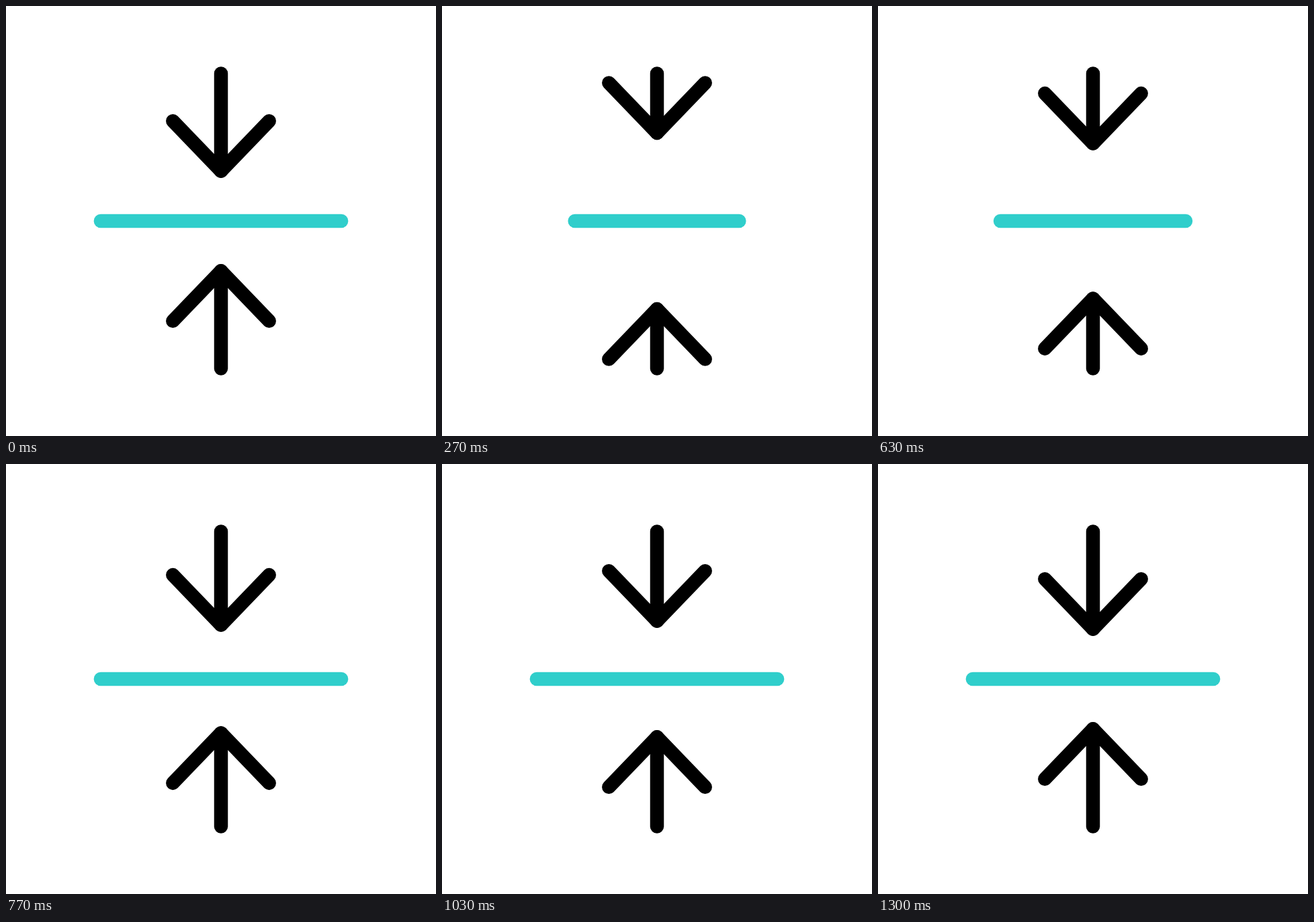
Write an HTML page with a canvas that moves like this. It is 640 px wide and 640 px high and loops after 2 s.

```html
<!DOCTYPE html>
<html lang="en">
<head>
<meta charset="utf-8">
<title>Collapse arrows</title>
<style>
  html, body { margin: 0; width: 100%; height: 100%; overflow: hidden; background: #fff; }
  canvas { display: block; width: 100vw; height: 100vh; }
</style>
</head>
<body>
<canvas id="stage" width="640" height="640"></canvas>
<script>
const ctx = document.getElementById('stage').getContext('2d');
const SIZE = 640, CENTER = SIZE / 2;
const LOOP = 2000;

// [step, offset in px], thirty steps per second
const SQUEEZE = [[0, 0], [15, 103.6], [22, 0]];
const BOUNCE = [...SQUEEZE, [28, 72.4], [32, 0], [36, 41], [39, 0]];

// Smoothstep with slightly firmer ends
function ease(x) {
  const smooth = x * x * (3 - 2 * x);
  return smooth + (x - smooth) * 0.107;
}

function valueAt(keys, step) {
  for (let i = 1; i < keys.length; i++) {
    const [start, from] = keys[i - 1];
    const [end, to] = keys[i];
    if (step < end) return from + (to - from) * ease((step - start) / (end - start));
  }
  return keys[keys.length - 1][1];
}

function stroke(color, ...points) {
  ctx.strokeStyle = color;
  ctx.beginPath();
  points.forEach(([x, y]) => ctx.lineTo(x, y));
  ctx.stroke();
}

function drawArrow(offset) {
  const tip = 245.7 - offset;
  const wing = 171.2 - offset;
  stroke('#000', [CENTER, 100.6], [CENTER, tip]);
  stroke('#000', [CENTER - 71.7, wing], [CENTER, tip], [CENTER + 71.7, wing]);
}

function draw(step) {
  ctx.fillStyle = '#fff';
  ctx.fillRect(0, 0, SIZE, SIZE);
  ctx.lineWidth = 20.5;
  ctx.lineCap = ctx.lineJoin = 'round';

  const half = 179.1 - valueAt(SQUEEZE, step);
  stroke('#30cecb', [CENTER - half, CENTER], [CENTER + half, CENTER]);

  const offset = valueAt(BOUNCE, step);
  drawArrow(offset);
  ctx.save();
  ctx.translate(0, SIZE);
  ctx.scale(1, -1);
  drawArrow(offset);
  ctx.restore();
}

function tick() {
  const time = performance.now() % LOOP;
  // Steps begin on whole hundredths of a second
  const tens = Math.floor(time / 10) * 10;
  draw(Math.floor((tens + 5) * 0.03));
  requestAnimationFrame(tick);
}
tick();
</script>
</body>
</html>
```
